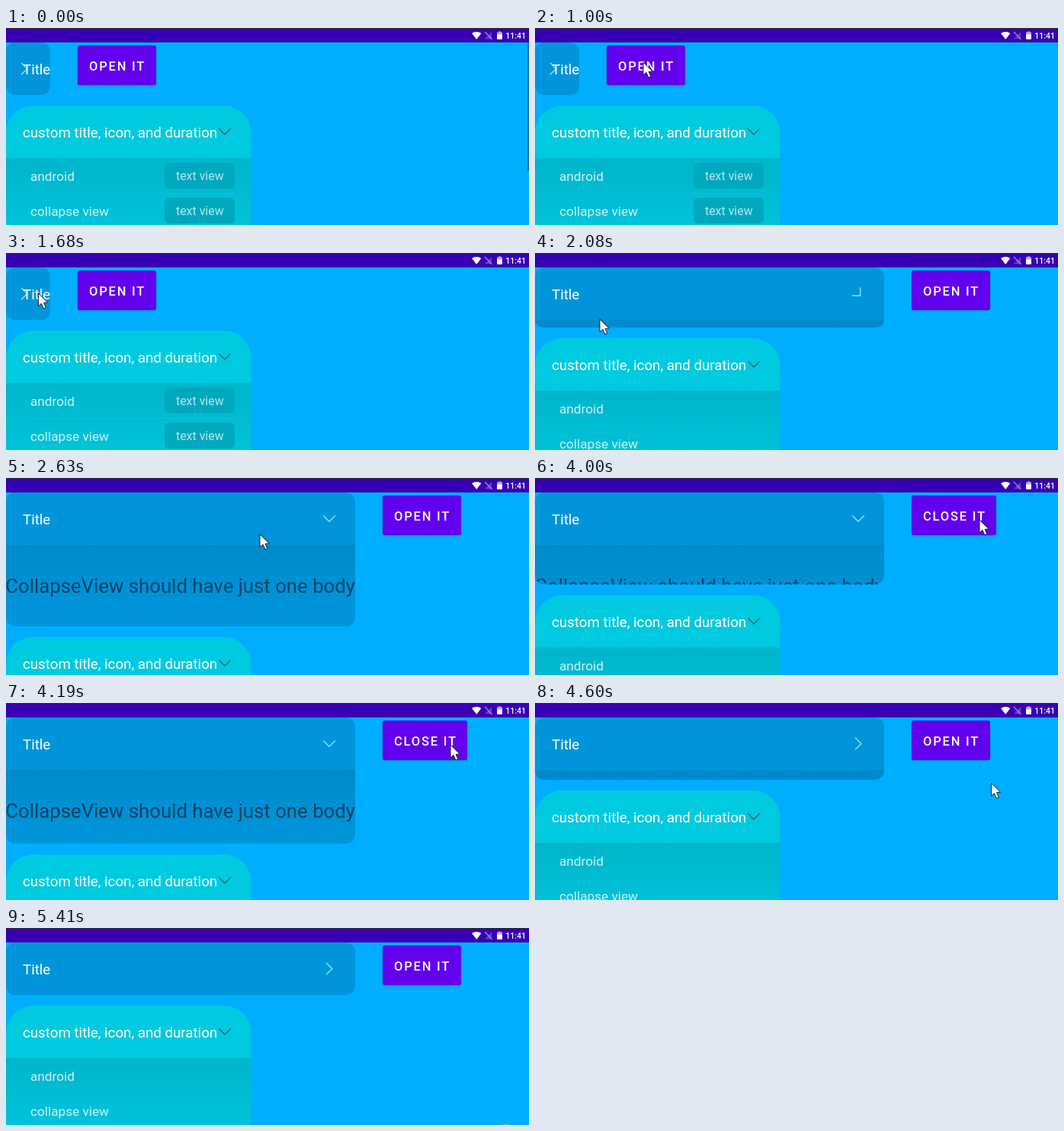
Recreate the animation shown at these times as an HTML page with a canvas. Size 686x259 px, loop 5.52 s.

```html
<!DOCTYPE html>
<html lang="en">
<head>
<meta charset="utf-8">
<title>Collapse view</title>
<style>
html, body { margin: 0; width: 100%; height: 100%; overflow: hidden; background: #00aeff; }
canvas { display: block; width: 686px; height: 259px; }
</style>
</head>
<body>
<canvas id="stage" width="686" height="259"></canvas>
<script>
const ctx = document.getElementById('stage').getContext('2d');
const LOOP = 5520;
const HEADER = 69, BODY = 107;
const OPEN_MS = 600, CLOSE_MS = 300, TURN_MS = 240;
const RUNS = [
  { open: 1960, close: 2970 },
  { open: 3707, close: 4370 }
];

// Pointer stops; each is reached by an eased move of at most MOVE_MS.
const MOVE_MS = 700;
const STOPS = [
  { at: 290, x: 432, y: 217 },
  { at: 1000, x: 142, y: 45 },
  { at: 1710, x: 42, y: 53 },
  { at: 2080, x: 85, y: 87 },
  { at: 2630, x: 333, y: 74 },
  { at: 2980, x: 422, y: 44 },
  { at: 3300, x: 440, y: 92 },
  { at: 3560, x: 447, y: 80 },
  { at: 3700, x: 583, y: 55 },
  { at: 5070, x: 646, y: 260 }
];

const clamp = v => Math.max(0, Math.min(1, v));
const ease = v => (1 - Math.cos(Math.PI * clamp(v))) / 2;
const mix = (a, b, k) => a + (b - a) * k;

function spread(t, openMs, closeMs) {
  return RUNS.reduce((sum, run) =>
    sum + ease((t - run.open) / openMs) - ease((t - run.close) / closeMs), 0);
}

function box(x, y, w, h, radii, fill) {
  ctx.fillStyle = fill;
  ctx.beginPath();
  ctx.roundRect(x, y, w, h, radii);
  ctx.fill();
}

function text(str, x, y, size, fill, weight = 400, spacing = 0) {
  ctx.font = `${weight} ${size}px Roboto, sans-serif`;
  ctx.letterSpacing = spacing + 'px';
  ctx.fillStyle = fill;
  ctx.fillText(str, x, y);
}

function shape(points, fill) {
  ctx.beginPath();
  points.forEach(([x, y]) => ctx.lineTo(x, y));
  ctx.closePath();
  ctx.fillStyle = fill;
  ctx.fill();
}

function line(points, width, color) {
  ctx.beginPath();
  points.forEach(([x, y]) => ctx.lineTo(x, y));
  ctx.lineWidth = width;
  ctx.strokeStyle = color;
  ctx.stroke();
}

function chevron(x, y, angle, color) {
  ctx.save();
  ctx.translate(x, y);
  ctx.rotate(angle);
  line([[-4, -7.7], [3.8, 0], [-4, 7.7]], 1.4, color);
  ctx.restore();
}

function fade(top, bottom, from, to) {
  const g = ctx.createLinearGradient(0, top, 0, bottom);
  g.addColorStop(0, from);
  g.addColorStop(1, to);
  return g;
}

function statusBar() {
  box(0, 0, 686, 19, 0, '#3700b3');
  box(0, 0, 686, 1, 0, '#2b2b2b');
  // wifi
  ctx.beginPath();
  ctx.moveTo(617.2, 15);
  ctx.arc(617.2, 15, 10, -Math.PI * 0.71, -Math.PI * 0.29);
  ctx.fillStyle = '#fff';
  ctx.fill();
  // no signal
  shape([[637, 5], [637, 14.5], [628, 14.5]], '#6340c4');
  line([[628, 5], [637.5, 15]], 1.1, '#a18bdc');
  // battery
  box(646, 4.5, 3, 2, 0, '#b9a5e4');
  box(644, 5.5, 7, 4, 0, '#b9a5e4');
  box(644, 8.5, 7, 6.5, [0, 0, 1, 1], '#fff');
  text('11:41', 655.3, 14, 10.5, '#fff', 500);
}

function firstCard(width, h, turn) {
  const low = h > 0 ? 0 : 12;
  box(0, 19, width, HEADER, [12, 12, low, low], '#0095da');
  if (h > 0) {
    const r = Math.min(12, h);
    ctx.save();
    ctx.beginPath();
    ctx.roundRect(0, 88, width, h, [0, 0, r, r]);
    ctx.clip();
    box(0, 88, width, h, 0, fade(88, 175, '#008aca', '#0095da'));
    text('CollapseView should have just one body', -0.8, 151, 25.78, 'rgba(0,15,30,.6)');
    ctx.restore();
  }
  chevron(width - 34, 53.5, turn * Math.PI / 2, '#8be6f6');
  text('Title', 22, 60.5, 18.7, '#fff');
}

function row(label, y, withPill) {
  text(label, 32, y + 24, 17.2, 'rgba(255,255,255,.8)');
  if (!withPill) return;
  box(208, y, 92, 34, 6, '#00a8be');
  text('text view', 223, y + 23, 15.9, 'rgba(255,255,255,.72)');
}

function secondCard(h, withPills) {
  ctx.save();
  ctx.translate(0, h);
  box(0, 102, 321.5, HEADER, [36, 36, 0, 0], '#00cadf');
  box(0, 171, 321.5, 100, 0, fade(171, 259, '#00b5cb', '#00c3da'));
  if (withPills) box(32, 217, 268, 1, 0, 'rgba(255,255,255,.06)');
  chevron(287, 136.3, Math.PI / 2, '#3c5f72');
  text('custom title, icon, and duration', 22, 143.5, 18.73, '#fff');
  row('android', 177, withPills);
  row('collapse view', 223, withPills);
  ctx.restore();
}

function button(x, open) {
  ctx.save();
  ctx.shadowColor = 'rgba(0,30,80,.3)';
  ctx.shadowBlur = 2;
  ctx.shadowOffsetY = 1;
  box(x, 23, open ? 111 : 103, 52, 3, '#6200ee');
  ctx.restore();
  text(open ? 'CLOSE IT' : 'OPEN IT', x + 15, 56, 16.5, '#fff', 500, 1.8);
}

function pointer(t) {
  const next = STOPS.findIndex(stop => stop.at > t);
  if (next < 1) return;
  const from = STOPS[next - 1], to = STOPS[next];
  const k = ease(1 - (to.at - t) / Math.min(MOVE_MS, to.at - from.at));
  ctx.save();
  ctx.translate(mix(from.x, to.x, k), mix(from.y, to.y, k));
  shape([[0, 0], [0, 17], [4, 13.4], [6.8, 20], [9.8, 18.7], [7.1, 12.4], [12.2, 12]], '#fff');
  ctx.lineWidth = 1;
  ctx.strokeStyle = '#17212b';
  ctx.stroke();
  ctx.restore();
}

function draw(t) {
  const fresh = t < RUNS[0].open;
  const width = fresh ? 58 : 458;
  const h = Math.round(BODY * spread(t, OPEN_MS, CLOSE_MS));
  const byButton = t >= RUNS[1].open && t < RUNS[1].close;

  box(0, 0, 686, 259, 0, '#00aeff');
  statusBar();
  const bar = 1 - clamp((t - 290) / 260);
  box(684, 19, 2, 169, 0, `rgba(30,75,115,${0.6 * bar})`);
  firstCard(width, h, spread(t, TURN_MS, TURN_MS));
  secondCard(h, fresh);
  button(width + 36, byButton);
  pointer(t);

  if (t >= 5410) {
    ctx.beginPath();
    ctx.ellipse(656, 260, 6, 2, 0, 0, 2 * Math.PI);
    ctx.fillStyle = '#a5c84a';
    ctx.fill();
  }
}

const start = performance.now();
function tick() {
  draw((performance.now() - start) % LOOP);
  requestAnimationFrame(tick);
}
tick();
</script>
</body>
</html>
```
